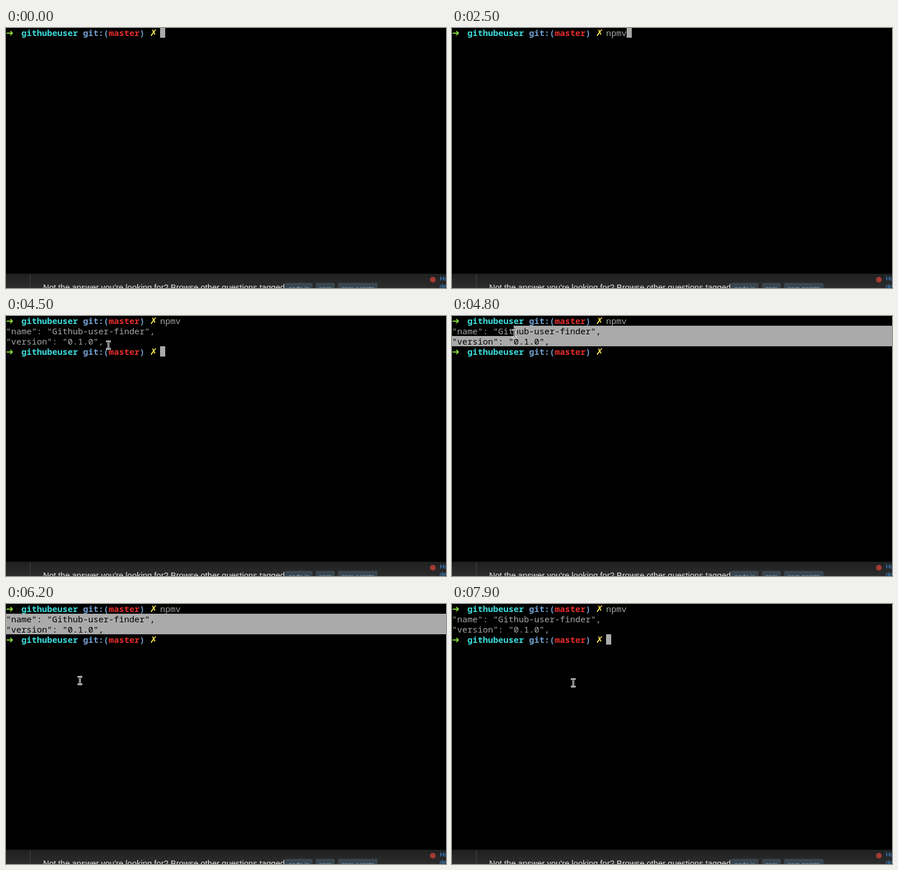
These frames come from a looping animation (771 by 455 pixels, 8 s). An HTML page:

```html
<!DOCTYPE html>
<html lang="en">
<head>
<meta charset="utf-8">
<title>Terminal</title>
<style>
  html, body { margin: 0; width: 100%; height: 100%; overflow: hidden; background: #000; }
  svg { display: block; width: 771px; height: 455px; }
  text { white-space: pre; }
  .mono { font: 15px "Noto Sans Mono", "DejaVu Sans Mono", monospace; fill: #a6a6a2; }
  .bold { font-weight: 700; }
  .sym { font: 16px "DejaVu Sans", sans-serif; }
  .page { font-family: "Liberation Sans", Arial, sans-serif; }
  .green { fill: #8ad83a; }
  .cyan { fill: #3cdcdc; }
  .blue { fill: #729fcf; }
  .red { fill: #e62e2c; }
  .yellow { fill: #f6e44d; }
  .dark text { fill: #000; }
  .tag { font-size: 11px; fill: #9cc3db; }
</style>
</head>
<body>
<svg viewBox="0 0 771 455">
  <defs>
    <linearGradient id="shade" x1="0" y1="0" x2="0" y2="1">
      <stop offset="0" stop-color="#202020"/>
      <stop offset="1" stop-color="#2c2c2c"/>
    </linearGradient>
    <g id="prompt" class="mono bold">
      <text class="sym green" x="0" y="14">➜</text>
      <text class="cyan" x="27" y="14">githubeuser</text>
      <text class="blue" x="135" y="14">git:(</text>
      <text class="red" x="180" y="14">master</text>
      <text class="blue" x="234" y="14">)</text>
      <text class="sym yellow" x="252" y="14">✗</text>
    </g>
    <clipPath id="picked">
      <rect class="sel1" y="17" width="771" height="18"/>
      <rect class="sel2" y="35" width="771" height="18"/>
    </clipPath>
  </defs>

  <rect width="771" height="455"/>
  <g class="page">
    <rect y="430" width="771" height="25" fill="url(#shade)"/>
    <rect x="42" y="430" width="1" height="25" fill="#434547"/>
    <text x="65" y="459" font-size="14.5" fill="#e7e8eb">Not the answer you're looking for? Browse other questions tagged</text>
    <g fill="#39464f">
      <rect x="489" y="446" width="48" height="20" rx="2"/>
      <rect x="543" y="446" width="33" height="20" rx="2"/>
      <rect x="582" y="446" width="69" height="20" rx="2"/>
    </g>
    <text class="tag" x="495.5" y="460">node.js</text>
    <text class="tag" x="549" y="460">npm</text>
    <text class="tag" x="588" y="460">npm-scripts</text>
    <circle cx="748" cy="440.5" r="5" fill="#a33a33"/>
    <g font-size="11" fill="#3d8fdd">
      <text x="760" y="442">Ho</text>
      <text x="760" y="456">de</text>
    </g>
  </g>

  <use href="#prompt"/>
  <text id="typed" class="mono" x="270" y="14"></text>
  <g id="result">
    <g id="lines" class="mono">
      <text x="0" y="32">"name": "Github-user-finder",</text>
      <text x="0" y="50">"version": "0.1.0",</text>
    </g>
    <use href="#prompt" y="54"/>
  </g>
  <rect class="sel1" y="17" width="771" height="18" fill="#aaa"/>
  <rect class="sel2" y="35" width="771" height="18" fill="#aaa"/>
  <g id="inverse" class="mono dark" clip-path="url(#picked)"></g>
  <rect id="caret" width="9" height="18" fill="#aaa"/>
  <g id="mouse" fill="none">
    <path stroke="#fff" stroke-width="3" stroke-linecap="square"
      d="M-2.5 -6.5H-1L0 -5.5L1 -6.5H2.5M0 -5.5V5.5M-2.5 6.5H-1L0 5.5L1 6.5H2.5"/>
    <path stroke="#000" d="M-3 -6.5H-1L0 -5.5L1 -6.5H3M0 -5.5V5.5M-3 6.5H-1L0 5.5L1 6.5H3"/>
  </g>
</svg>
<script>
const LOOP = 8000, STEP = 100, CELL = 9, WIDE = 771;
const COMMAND = "npmv", KEYS = [900, 1000, 1200, 2500], ENTER = 2800;
const DRAG = { start: 4700, end: 5500, clear: 7700 };

// The caret flips at each of these times, regularly once the drag is under way.
const flips = [1600, 2200, 3300, 4000, 4700];
for (let t = 5100; t < LOOP; t += 600) flips.push(t);

// The pointer enters, then makes eased moves and rests between them.
const ENTRY = { time: 3400, x: 590, y: 30 };
const moves = [
  { from: 3400, to: 3600, x: 286, y: 60 },
  { from: 3700, to: 4200, x: 186, y: 56 },
  { from: 4400, to: 4500, x: 180, y: 51 },
  { from: 4600, to: 4800, x: 110, y: 31 },
  { from: 4800, to: 5500, x: 6, y: 27 },
  { from: 5900, to: 6000, x: 38, y: 47 },
  { from: 6100, to: 6200, x: 130, y: 134 },
  { from: 6200, to: 6900, x: 153, y: 145 },
  { from: 7800, to: 7900, x: 213, y: 138 },
];

const $ = id => document.getElementById(id);
const passed = (times, t) => times.filter(s => s <= t).length;
const easeOut = p => 1 - (1 - p) ** 2;
const show = (el, on) => el.setAttribute("visibility", on ? "visible" : "hidden");
const selectFrom = (row, x) => document.querySelectorAll(row).forEach(r => {
  r.setAttribute("x", x);
  r.setAttribute("width", WIDE - x);
});

function pointer(t) {
  let { x, y } = ENTRY;
  for (const m of moves) {
    if (t <= m.from) break;
    const p = easeOut(Math.min(1, (t - m.from) / (m.to - m.from)));
    x += (m.x - x) * p;
    y += (m.y - y) * p;
  }
  return { x, y };
}

// The selection runs from the pointer's cell to the end of the second row.
function drawSelection(t) {
  const { x, y } = pointer(Math.min(t, DRAG.end));
  const edge = Math.floor(x / CELL) * CELL;
  const active = t >= DRAG.start && t < DRAG.clear, upper = y < 35;
  selectFrom(".sel1", active && upper ? edge : WIDE);
  selectFrom(".sel2", !active ? WIDE : upper ? 0 : edge);
}

function draw(t) {
  const count = passed(KEYS, t), done = t >= ENTER;
  $("typed").textContent = COMMAND.slice(0, count);
  show($("result"), done);

  $("caret").setAttribute("x", 270 + (done ? 0 : count * CELL));
  $("caret").setAttribute("y", done ? 53 : -1);
  show($("caret"), passed(flips, t) % 2 === 0);

  drawSelection(t);

  const { x, y } = pointer(t);
  show($("mouse"), t >= ENTRY.time);
  $("mouse").setAttribute("transform", `translate(${Math.round(x) - 0.5} ${Math.round(y)})`);
}

$("inverse").innerHTML = $("lines").innerHTML;
const start = performance.now();
function tick(now) {
  const t = Math.max(0, now - start) % LOOP;
  draw(Math.floor(t / STEP) * STEP);
  requestAnimationFrame(tick);
}
draw(0);
requestAnimationFrame(tick);
</script>
</body>
</html>
```
